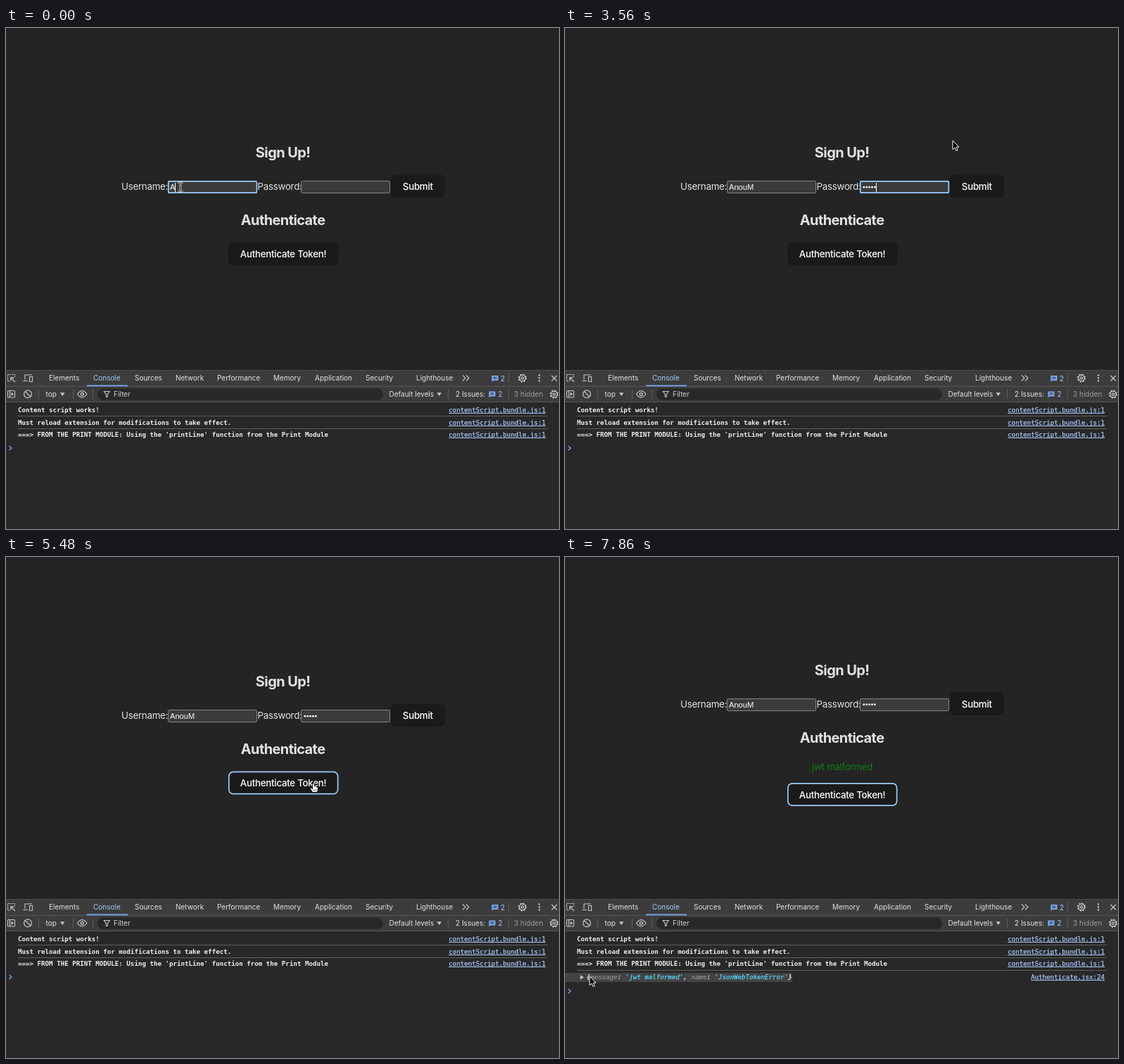
Recreate the animation shown at these times as an HTML page with a canvas. Size 786 by 712 pixels, loop 8000 ms.

```html
<!DOCTYPE html>
<html lang="en">
<head>
<meta charset="utf-8">
<title>Sign up and authenticate</title>
<style>
html, body { margin: 0; width: 100%; height: 100%; overflow: hidden; background: #242424; }
canvas { display: block; }
</style>
</head>
<body>
<canvas id="stage" width="786" height="712"></canvas>
<script>
const ctx = document.getElementById('stage').getContext('2d');
const LOOP = 8000;
const UI = 'Inter, Roboto, sans-serif';
const MONO = '"DejaVu Sans Mono", "Liberation Mono", monospace';
const FIELD = '"Liberation Sans", Arial, sans-serif';
const BLUE = '#a8c7fa', FOCUS = '#9dcbfb', ICON = '#c7c7c7', RULE = '#5e5e5e';
const USER = 'AnouM';

// [start time, shape, x, y] of the pointer
const POINTER = [
  [0, 'beam', 248, 226],
  [3410, 'arrow', 490, 172], [3560, 'arrow', 551, 160], [3710, 'arrow', 556, 164],
  [3850, 'arrow', 565, 184], [4000, 'hand', 573, 211], [4150, 'hand', 576, 223],
  [4290, 'hand', 577, 227], [5040, 'hand', 568, 241],
  [5190, 'arrow', 535, 268], [5330, 'arrow', 472, 303], [5480, 'hand', 437, 321],
  [6230, 'arrow', 434, 322], [6680, 'arrow', 434, 320], [6830, 'arrow', 424, 343],
  [6970, 'arrow', 388, 415], [7120, 'arrow', 325, 500], [7270, 'arrow', 255, 558],
  [7410, 'arrow', 195, 584], [7560, 'arrow', 105, 592], [7710, 'arrow', 48, 594],
  [7860, 'arrow', 35, 596]
];
const NAME_KEYS = [0, 290, 440, 580, 880];
const PASS_KEYS = [1780, 1930, 2220, 2370, 2520];

const arrow = new Path2D('M0 0V12.6L2.9 9.9L4.9 14.4L7 13.5L5.1 9.1H9Z');
const hand = new Path2D('M-1.4 1.2Q0 -.8 1.3 1.2V4.8Q2.6 4 3.4 5.3Q4.8 4.7 5.2 6.1Q6.8 5.9 6.6 8' +
  'L6.2 10.8L5 13.5H-1.7L-2.2 11.8L-4.8 8.2Q-5 6.4 -3.5 7L-1.4 8.7Z');
const beam = new Path2D('M-4 -7Q-1 -7 0 -5Q1 -7 4 -7M0 -5V5M-4 7Q-1 7 0 5Q1 7 4 7M-2 1H2');

const count = (keys, t) => keys.filter(k => k <= t).length;
const between = (t, a, b) => t >= a && t < b;

function text(s, x, y, font, color, align = 'left', spacing = 0) {
  ctx.font = font;
  ctx.fillStyle = color;
  ctx.textAlign = align;
  ctx.letterSpacing = spacing + 'px';
  ctx.fillText(s, x, y);
}

function box(x, y, w, h, r, fill, stroke, width = 1) {
  ctx.beginPath();
  ctx.roundRect(x, y, w, h, r);
  if (fill) { ctx.fillStyle = fill; ctx.fill(); }
  if (stroke) { ctx.strokeStyle = stroke; ctx.lineWidth = width; ctx.stroke(); }
}

function rect(x, y, w, h, color) {
  ctx.fillStyle = color;
  ctx.fillRect(x, y, w, h);
}

function icon(d, color = ICON, width = 1.1) {
  ctx.strokeStyle = color;
  ctx.lineWidth = width;
  ctx.stroke(new Path2D(d));
}

function shape(d, color = ICON) {
  ctx.fillStyle = color;
  ctx.fill(new Path2D(d));
}

function circle(x, y, r, color, filled = false, width = 1.1) {
  ctx.beginPath();
  ctx.arc(x, y, r, 0, Math.PI * 2);
  ctx.fillStyle = ctx.strokeStyle = color;
  ctx.lineWidth = width;
  filled ? ctx.fill() : ctx.stroke();
}

function gear(x, y) {
  const tooth = Math.PI * 5.2 / 8;
  ctx.setLineDash([tooth, tooth]);
  circle(x, y, 5.2, ICON, false, 1.8);
  ctx.setLineDash([]);
  circle(x, y, 4.3, ICON, false, 1.3);
  circle(x, y, 1.7, ICON, false, 1.2);
}

function issue(x, y) {
  shape(`M${x - 4.5} ${y - 4}h9v7h-7l-2 2z`, '#7cacf8');
  rect(x - 2.5, y - 2.2, 5, 1, '#303030');
  rect(x - 2.5, y - 0.2, 5, 1, '#303030');
}

const heading = (s, y) => text(s, 393.6, y, `700 20px ${UI}`, '#e2e2e2', 'center', -0.6);
const label = (s, x, y) => text(s, x, y, `400 13.33px ${UI}`, '#e2e2e2', 'left', -0.27);
const small = (s, x, y, color = '#e3e3e3') => text(s, x, y, `400 10px ${UI}`, color);

function mono(s, x, y, color, style = '', align) {
  text(s, x, y, `${style} 9.17px ${MONO}`, color, align);
  if (style === 'bold') return;
  // slightly heavier strokes for the regular weight
  ctx.strokeStyle = color;
  ctx.lineWidth = 0.25;
  ctx.strokeText(s, x, y);
}

function input(x, y, focused) {
  box(x + 0.5, y + 0.5, 126, 17, 1, '#3b3b3b', '#858585');
  if (focused) box(x + 0.8, y + 0.8, 125.6, 16.4, 2, null, FOCUS, 1.7);
}

function button(s, x, y, w, focused) {
  box(x, y, w, 33, 6.7, '#1a1a1a');
  if (focused) box(x + 0.85, y + 0.85, w - 1.7, 31.3, 6.2, null, FOCUS, 1.7);
  text(s, x + w / 2 - 0.2, y + 21.5, `500 13.33px ${UI}`, '#fff', 'center', -0.28);
}

function link(s, y) {
  mono(s, 767, y, BLUE, '', 'right');
  const w = ctx.measureText(s).width;
  rect(767 - w, y + 1, w, 1, BLUE);
}

function page(t, failed) {
  const up = failed ? -16.5 : 0;
  const inputY = Math.round(217 + up);
  const onName = t < 1180, onPass = between(t, 1180, 4440);
  heading('Sign Up!', 184 + up);
  label('Username:', 164, 230 + up);
  label('Password:', 357.5, 230 + up);
  button('Submit', 547, 208.5 + up, 77, between(t, 4440, 5480));
  input(230, inputY, onName);
  input(419, inputY, onPass);

  const typed = USER.slice(0, count(NAME_KEYS, t));
  text(typed, 233, 230 + up, `11.1px ${FIELD}`, '#fff');
  if (onName) rect(Math.round(233 + ctx.measureText(typed).width), 220, 1, 13, '#fff');

  const dots = count(PASS_KEYS, t);
  for (let i = 0; i < dots; i++) circle(424.8 + i * 3.9, 226.2 + up, 1.4, '#fff', true);
  const blink = between(t, 1630, 1780) || between(t, 3120, 3410) || t >= 4150;
  if (onPass && !blink) rect(Math.round(423 + dots * 3.85), 220, 1, 13, '#fff');

  heading('Authenticate', 280 + up);
  if (failed) text('jwt malformed', 394, 303, `400 13.33px ${UI}`, '#108010', 'center', -0.3);
  button('Authenticate Token!', 316, 304.5 - up, 156.5, t >= 5480);
}

function tabBar() {
  rect(0, 486, 786, 46, '#3c3c3c');
  rect(0, 486, 786, 1, '#4c4c4c');
  rect(0, 508.8, 786, 0.83, RULE);
  rect(0, 531.2, 786, 0.83, RULE);

  ctx.setLineDash([2, 1]);
  icon('M5 502H2.5V492.5H12.5V496');
  ctx.setLineDash([]);
  icon('M13 503L7 497M6.8 501.5V496.8H11.5', ICON, 1.2);
  icon('M27 500V493H37M24.5 501.5H31M33.5 495.5H37.5V502.5H33.5Z');

  const tabs = { Elements: 61, Console: 124, Sources: 183, Network: 241, Performance: 300,
    Memory: 380, Application: 439, Security: 511, Lighthouse: 583 };
  for (const [name, x] of Object.entries(tabs)) small(name, x, 501, name === 'Console' ? BLUE : '#e3e3e3');
  rect(115, 507.5, 58, 1.7, '#7cacf8');

  icon('M649 493.5L653 497.5L649 501.5M654 493.5L658 497.5L654 501.5');
  issue(695, 498);
  small('2', 703, 502, BLUE);
  rect(714, 491, 1, 13, RULE);
  gear(734, 497.5);
  for (const y of [493.5, 497.5, 501.5]) circle(758, y, 1.2, ICON, true);
  icon('M775.5 494L783 501.5M783 494L775.5 501.5', ICON, 1.2);
}

function toolBar() {
  box(2.5, 515.5, 10, 9.5, 1, null, ICON, 1.1);
  icon('M5.5 515.5V525');
  shape('M7.5 517.5L11 520.2L7.5 523Z');
  circle(31, 520.3, 5.4, ICON, false, 1.2);
  icon('M27.3 516.5L34.8 524', ICON, 1.2);
  for (const x of [46, 95, 123, 628, 714]) rect(x, 514, 1, 13, RULE);
  small('top', 56.5, 524);
  shape('M77 518.3H83.4L80.2 523Z');
  icon('M101.5 520.3Q108.3 511 115 520.3Q108.3 529.5 101.5 520.3Z');
  circle(108.3, 520.3, 2, ICON, false, 1.3);

  box(130, 512.3, 406, 16.4, 8.2, '#282828');
  icon('M139.3 516.5H147.3L144.3 520.4V524.3H142.3V520.4Z');
  small('Filter', 153, 524, '#d0d0d0');
  small('Default levels', 544.5, 524);
  shape('M612.5 518.3H619L615.8 523Z');
  small('2 Issues:', 639, 524);
  issue(691, 520.5);
  small('2', 699.5, 524, BLUE);
  small('3 hidden', 722, 524, '#9c9c9c');
  gear(779, 520.5);
}

function log(t, failed) {
  rect(0, 532, 786, 180, '#282828');
  const rows = [
    ['Content script works!', 546],
    ['Must reload extension for modifications to take effect.', 564],
    ["===> FROM THE PRINT MODULE: Using the 'printLine' function from the Print Module", 581]
  ];
  for (const [s, y] of rows) {
    mono(s, 17, y, '#f0f0f0', 'bold');
    link('contentScript.bundle.js:1', y);
  }
  rect(17, 551, 753, 1, RULE);
  rect(17, 569, 753, 1, RULE);

  if (failed) {
    rect(17, 587, 753, 1, RULE);
    if (t >= 7560) rect(0, 591, 323, 13, '#434343');
    shape('M21.8 594.2L26.8 597.3L21.8 600.4Z', '#c7c7c7');
    const parts = [['{', '#fff'], ['message', '#909090'], [': ', '#e3e3e3'],
      ["'jwt malformed'", '#5cd5fb'], [', ', '#e3e3e3'], ['name', '#909090'], [': ', '#e3e3e3'],
      ["'JsonWebTokenError'", '#5cd5fb'], ['}', '#fff']];
    let x = 30.5;
    for (const [s, color] of parts) {
      mono(s, x, 600, color, 'italic');
      x += ctx.measureText(s).width;
    }
    link('Authenticate.jsx:24', 600);
  }
  const y = failed ? 617 : 597;
  icon(`M4.6 ${y - 3}L8 ${y}L4.6 ${y + 3}`, '#7cacf8', 1.2);
}

function pointer(t) {
  const [, kind, x, y] = POINTER.findLast(p => p[0] <= t);
  ctx.save();
  ctx.translate(x, y);
  ctx.lineJoin = 'round';
  if (kind === 'beam') {
    ctx.strokeStyle = '#f4f4f4';
    ctx.lineWidth = 2.6;
    ctx.stroke(beam);
    ctx.strokeStyle = '#111';
    ctx.lineWidth = 1;
    ctx.stroke(beam);
  } else {
    const isHand = kind === 'hand';
    ctx.fillStyle = isHand ? '#fff' : '#000';
    ctx.strokeStyle = isHand ? '#111' : '#fff';
    ctx.lineWidth = 1;
    ctx.fill(isHand ? hand : arrow);
    ctx.stroke(isHand ? hand : arrow);
    if (isHand) {
      ctx.lineWidth = 0.6;
      ctx.stroke(new Path2D('M.4 9.2V11.6M2.2 9.2V11.6M4 9.2V11.6'));
    }
  }
  ctx.restore();
}

function draw(now) {
  const t = now % LOOP;
  const failed = t >= 5780;
  rect(0, 0, 786, 712, '#242424');
  page(t, failed);
  tabBar();
  toolBar();
  log(t, failed);
  pointer(t);
}

const start = performance.now();
function tick() {
  draw(performance.now() - start);
  requestAnimationFrame(tick);
}
tick();
</script>
</body>
</html>
```
